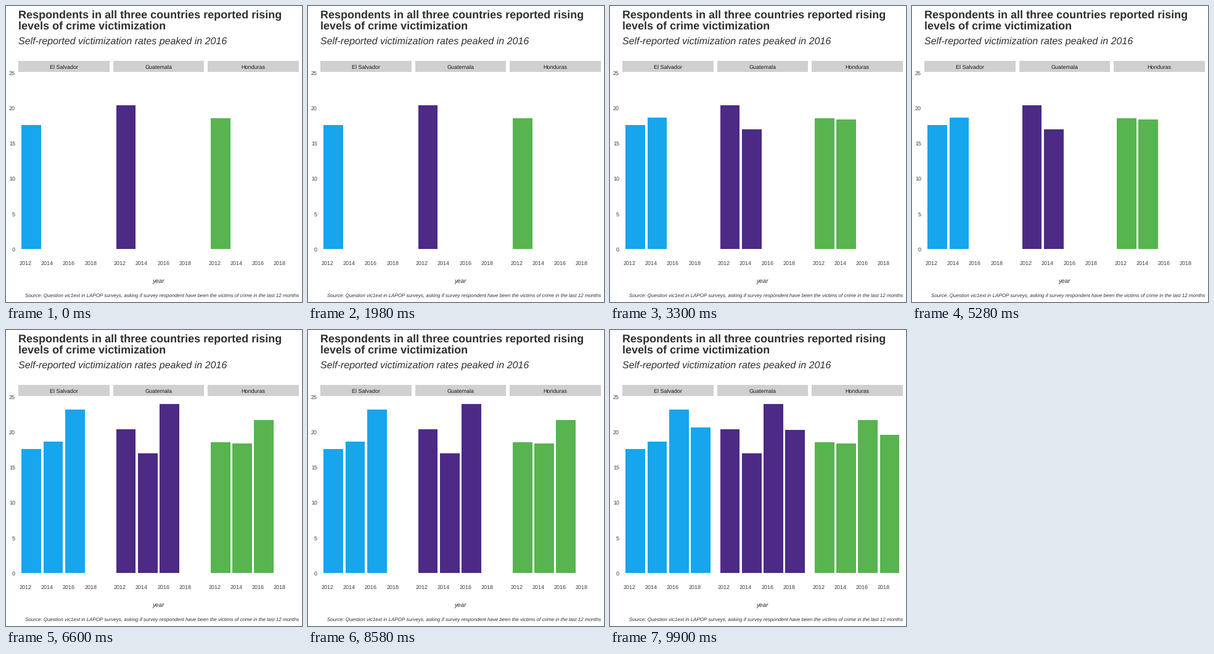
Animation, 480 px wide and 480 px high, one loop 10000 ms. Source, as a matplotlib script:

```python
import matplotlib.pyplot as plt
from matplotlib.animation import FuncAnimation
from matplotlib.patches import Rectangle

SIZE, DPI = 480, 80
FRAMES, INTERVAL = 100, 100
FRAMES_PER_YEAR = 33

BASE_Y, UNIT = 394.2, 11.44
BAR_LEFT, BAR_STEP, BAR_WIDTH = 25.4, 35.2, 31.75
PANEL_STEP = 153.3

YEARS = (2012, 2014, 2016, 2018)
PANELS = (
    ("El Salvador", "#17A5ED", (17.6, 18.64, 23.2, 20.65)),
    ("Guatemala", "#4C2A85", (20.4, 17.0, 24.0, 20.3)),
    ("Honduras", "#57B44F", (18.55, 18.38, 21.7, 19.6)),
)

plt.rcParams["font.family"] = "Liberation Sans"
plt.rcParams["text.hinting"] = "none"

fig = plt.figure(figsize=(SIZE / DPI, SIZE / DPI), dpi=DPI, facecolor="white")
ax = fig.add_axes([0, 0, 1, 1])
ax.set_xlim(0, SIZE)
ax.set_ylim(SIZE, 0)
ax.axis("off")


def label(x, y, text, px, color="#3C3C3C", ha="left", **style):
    """Write text on baseline y with its size in pixels."""
    ax.text(x, y, text, fontsize=px * 72 / DPI, color=color,
            ha=ha, va="baseline", **style)


def box(x0, y0, x1, y1, color):
    """Fill a rectangle whose edges sit on whole pixels."""
    x0, y0, x1, y1 = (round(v) for v in (x0, y0, x1, y1))
    return ax.add_patch(Rectangle((x0, y0), x1 - x0, y1 - y0,
                                  facecolor=color, linewidth=0))


label(20, 19, "Respondents in all three countries reported rising", 18,
      "#2E2E2E", weight="bold")
label(20, 38, "levels of crime victimization", 18, "#2E2E2E", weight="bold")
label(20, 62, "Self-reported victimization rates peaked in 2016", 16,
      "#2E2E2E", style="italic")

for k in range(6):
    label(15, round(397.8 - 5 * UNIT * k), str(5 * k), 9, ha="right")

bars = [[] for _ in YEARS]
for p, (name, color, rates) in enumerate(PANELS):
    dx = p * PANEL_STEP
    box(20.2 + dx, 89, 168 + dx, 107, "#D0D0D0")
    label(94 + dx, 102, name, 9, "#1A1A1A", ha="center")
    for i, (year, rate) in enumerate(zip(YEARS, rates)):
        left = BAR_LEFT + dx + i * BAR_STEP
        bars[i].append(box(left, BASE_Y - UNIT * rate,
                           left + BAR_WIDTH, BASE_Y, color))
        label(31.5 + dx + i * BAR_STEP, 420, str(year), 9, ha="center")

label(247.5, 449, "year", 10, "#2E2E2E", ha="center", style="italic")
label(475, 472, "Source: Question vic1ext in LAPOP surveys, asking if survey "
      "respondent have been the victims of crime in the last 12 months",
      8, "#2E2E2E", ha="right", style="italic")


def update(frame):
    shown = frame // FRAMES_PER_YEAR
    for i, group in enumerate(bars):
        for bar in group:
            bar.set_visible(i <= shown)
    return [bar for group in bars for bar in group]


anim = FuncAnimation(fig, update, frames=FRAMES, interval=INTERVAL,
                     repeat=True, repeat_delay=0)
plt.show()
```
